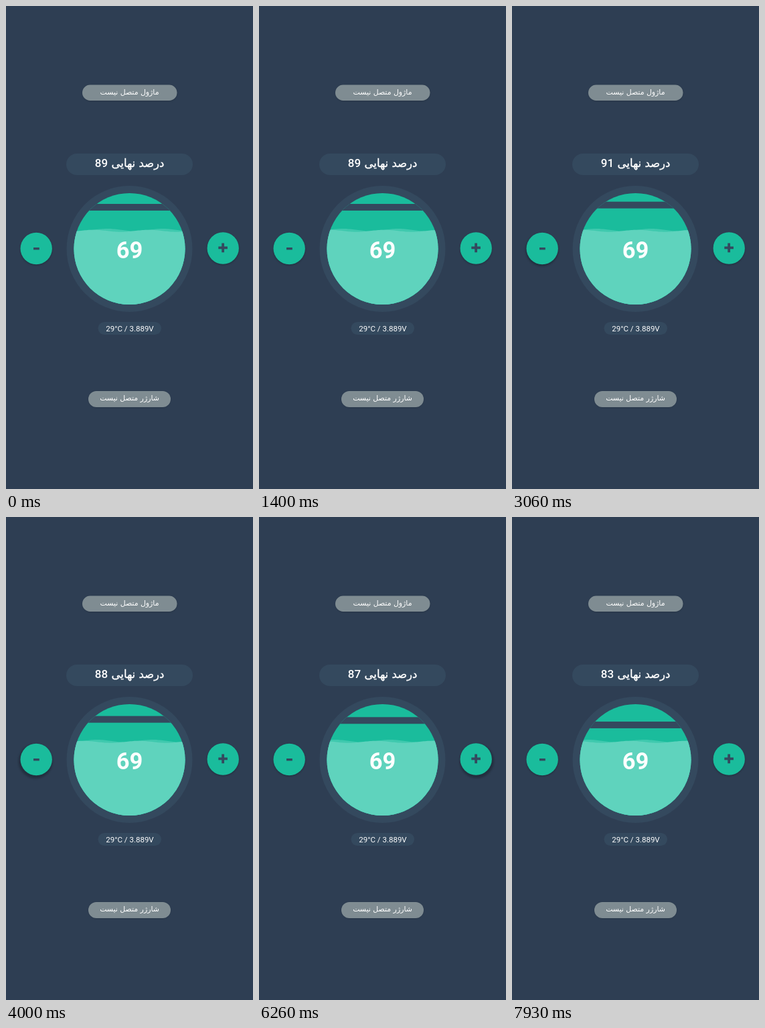
Recreate the animation shown at these times as an HTML page. Size 369x720 px, loop 8000 ms.

```html
<!DOCTYPE html>
<html lang="fa">
<head>
<meta charset="utf-8">
<title>Charge limit</title>
<style>
html, body { margin: 0; width: 100%; height: 100%; overflow: hidden; background: #2e3e53; }
svg { display: block; width: 100%; height: 100%; }
text { fill: #fff; text-anchor: middle; font-family: Roboto, "DejaVu Sans", sans-serif; }
.fa { font-family: "DejaVu Sans", sans-serif; }
.title { stroke: #fff; stroke-width: .4; }
.panel { fill: #34495e; }
.status { fill: #7f8c92; }
.teal { fill: #1abc9c; }
.rear { fill: #3fc9ae; }
.water { fill: #5fd3bd; }
.shade { fill: #000; filter: url(#soft); }
</style>
</head>
<body>
<svg viewBox="0 0 369 720">
  <defs>
    <clipPath id="bowl"><circle cx="184.5" cy="362" r="83"/></clipPath>
    <filter id="soft" x="-40%" y="-40%" width="180%" height="180%"><feGaussianBlur stdDeviation="1.8"/></filter>
  </defs>

  <rect class="shade" x="115" y="118.5" width="140" height="23" rx="11.5" opacity=".2"/>
  <rect class="status" x="114" y="117.5" width="141.5" height="23.5" rx="11.75"/>
  <text class="fa" x="184.5" y="131.5" font-size="10.9">ماژول متصل نیست</text>

  <rect class="panel" x="90" y="220" width="189" height="32" rx="16"/>
  <text class="fa title" x="197" y="240" font-size="16.5">درصد نهایی</text>
  <text id="goal" x="142.5" y="240" font-size="17" font-weight="500"></text>

  <circle class="panel" cx="184.5" cy="362" r="94"/>
  <g clip-path="url(#bowl)">
    <rect class="teal" x="100" y="278" width="170" height="168"/>
    <path id="rear" class="rear"/>
    <path id="front" class="water"/>
    <rect id="mark" class="panel" x="100" width="170" height="10"/>
  </g>
  <text x="184.5" y="376" font-size="34.5" font-weight="bold">69</text>

  <rect class="panel" x="137.5" y="471" width="94.5" height="19" rx="9.5"/>
  <text x="185" y="485" font-size="11.5">29°C / 3.889V</text>

  <circle id="minusShade" class="shade"/>
  <circle class="teal" cx="45.2" cy="361.5" r="23.7"/>
  <rect class="panel" x="41" y="360" width="8.8" height="3.4"/>

  <circle id="plusShade" class="shade"/>
  <circle class="teal" cx="324.2" cy="361" r="23.7"/>
  <path d="M317.3 360.4h13.6M324.1 353.6v13.6" stroke="#34495e" stroke-width="3.8"/>

  <rect class="shade" x="124" y="575" width="121" height="23" rx="11.5" opacity=".2"/>
  <rect class="status" x="123" y="574" width="123" height="24" rx="12"/>
  <text class="fa" x="184.5" y="588" font-size="10.9">شارژر متصل نیست</text>
</svg>
<script>
const LOOP = 8000, HOLD = 320;
const $ = id => document.getElementById(id);

// Tap times in ms for each button
const plus = [1700, 2100, 2500, 5780, 6120];
const minus = [3000, 3300, 3600, 3860, 4250, 4600, 4950, 6700, 7000, 7300, 7600];

const count = (taps, t) => taps.filter(tap => tap <= t).length;
const clamp = v => Math.max(0, Math.min(1, v));

// How far a tapped button is raised, 0 to 1
const lift = (taps, t) => Math.max(...taps.map(tap =>
  clamp((t - tap) / 200) * clamp((tap + HOLD - t) / 120)));

// The shadow spreads down and away from the middle of the stage
function shade(el, amount, x, y, side) {
  el.setAttribute('cx', x + side * 1.5 * amount);
  el.setAttribute('cy', y + 1.3 + 2 * amount);
  el.setAttribute('r', 23.5 + 3 * amount);
  el.setAttribute('opacity', .28 - .06 * amount);
}

function wave(el, t, level, height, shift) {
  const crest = 125 + (t - 1400) / 10;
  let d = 'M100 446';
  for (let x = 100; x <= 270; x += 2) {
    const angle = 2 * Math.PI * (x - crest) / 83 + shift;
    d += `L${x} ${(level - height * Math.cos(angle)).toFixed(2)}`;
  }
  el.setAttribute('d', d + 'L270 446Z');
}

function draw(now) {
  const t = now % LOOP;
  const goal = 89 + count(plus, t) - count(minus, t);
  $('goal').textContent = goal;
  $('mark').setAttribute('y', 295 + (89 - goal) * 1.66);
  wave($('rear'), t, 333.8, 1.8, 0);
  wave($('front'), t, 335.2, 1.5, Math.PI / 2);
  shade($('minusShade'), lift(minus, t), 45.2, 361.5, -1);
  shade($('plusShade'), lift(plus, t), 324.2, 361, 1);
  requestAnimationFrame(draw);
}
requestAnimationFrame(draw);
</script>
</body>
</html>
```
